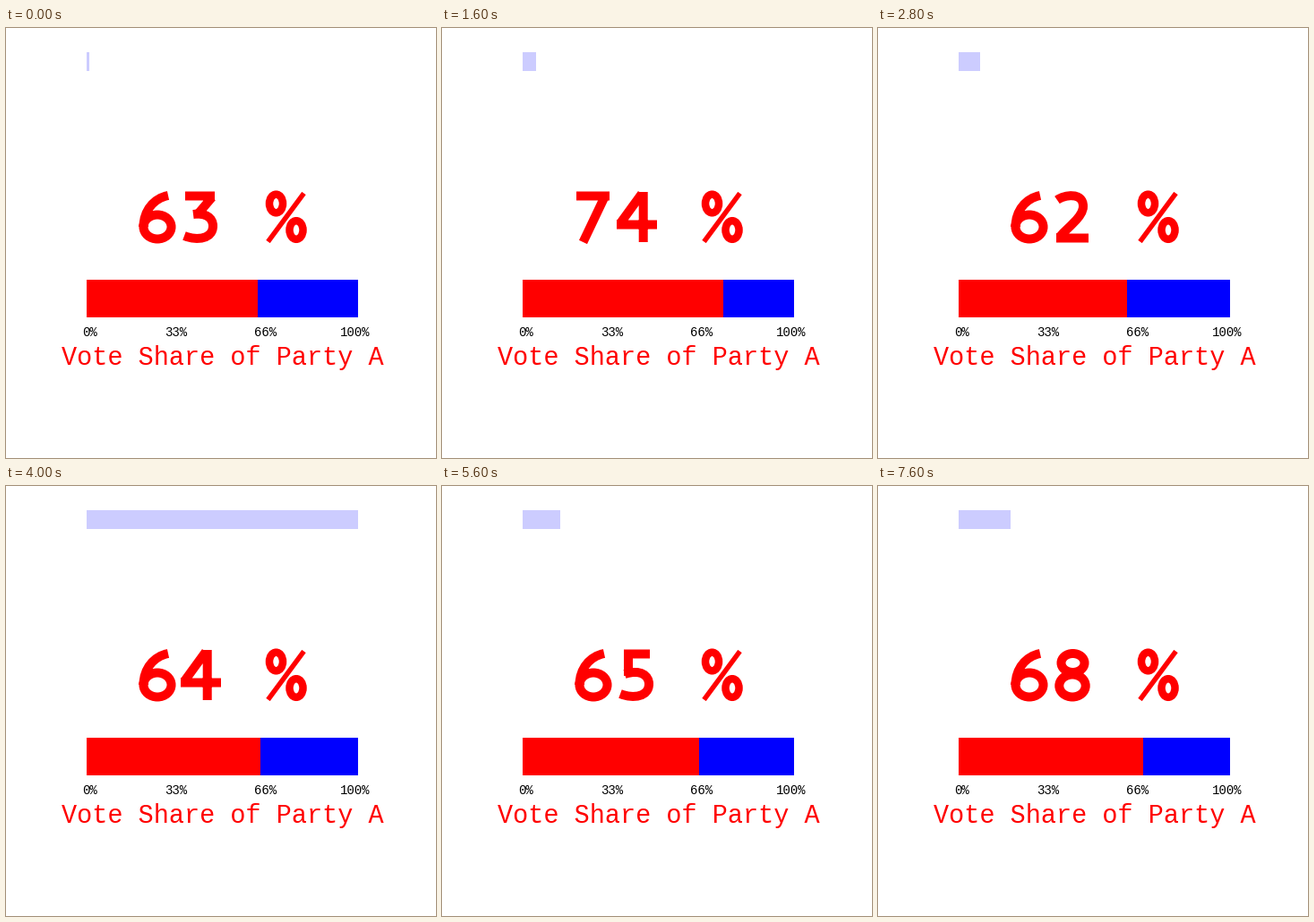
A matplotlib script for the animation above (8000 ms loop, 480x480 px).

```python
import numpy as np
import matplotlib.pyplot as plt
from matplotlib.animation import FuncAnimation
from matplotlib.patches import PathPatch, Rectangle
from matplotlib.path import Path

SIZE, DPI = 480, 100
PX = 72 / DPI
LEFT, WIDTH = 90, 303
RED, BLUE, PALE = "#ff0000", "#0000ff", "#ccccff"
CELL, CELL_TOP, NUMBER_X = 48, 182, 145

SHARES = [63, 69, 67, 65, 74, 66, 72, 62, 67, 65,
          64, 66, 72, 67, 65, 72, 62, 61, 71, 68]
ROUNDS = [*range(1, 11), 100, *range(11, 20)]

# Stroke outlines inside a 48 x 58 cell; O is an ellipse: cx cy rx ry.
GLYPHS = {
    "1": "M 6 16 L 25 4 M 25 1 L 25 53 M 8 52.5 L 43 52.5",
    "2": "M 7 10 C 15 4 36 1 36 17 C 36 29 19 40 10 51 M 6 52.5 L 42 52.5",
    "3": "M 7 5.5 L 40 5.5 M 37 7 L 20 27 M 16 26 "
         "C 30 24 38 30 38 39 C 38 53 21 56 6 50",
    "4": "M 2 37.5 L 47 37.5 M 31.7 1 L 31.7 57 M 30 3 L 6 36",
    "5": "M 10 5.5 L 39 5.5 M 15 1 L 15 30 M 11 28 "
         "C 29 22 38 30 38 39 C 38 53 21 56 6 50",
    "6": "M 36 5 C 20 8 8.5 22 8.5 40 O 24 40 15.5 13.5",
    "7": "M 5 5.5 L 42 5.5 M 37 5.5 L 12.5 57",
    "8": "O 24.5 15.5 13 10.5 O 24 41 14.7 12.5",
    "9": "M 12 53 C 28 50 39.5 36 39.5 18 O 24 18 15.5 13.5",
    "rings": "O 12.5 14 7.5 10.3 O 35 43.5 7.5 10.3",
    "slash": "M 3.5 56.5 L 43.5 2.5",
}
OPS = {"M": (2, Path.MOVETO), "L": (2, Path.LINETO),
       "C": (6, Path.CURVE4), "O": (4, None)}


def glyph(name, cell):
    """Build the path of a glyph placed in the given character cell."""
    tokens = iter(GLYPHS[name].split())
    circle = Path.unit_circle()
    points, codes = [], []
    for op in tokens:
        count, code = OPS[op]
        nums = np.array([float(next(tokens)) for _ in range(count)])
        if op == "O":
            points.extend(circle.vertices * nums[2:] + nums[:2])
            codes.extend(circle.codes)
        else:
            points.extend(nums.reshape(-1, 2))
            codes.extend([code] * (count // 2))
    origin = np.array([NUMBER_X + cell * CELL, CELL_TOP])
    return Path(np.array(points) + origin, codes)


fig = plt.figure(figsize=(SIZE / DPI, SIZE / DPI), dpi=DPI, facecolor="white")
ax = fig.add_axes([0, 0, 1, 1])
ax.set(xlim=(0, SIZE), ylim=(SIZE, 0))
ax.axis("off")


def bar(top, height, color):
    return ax.add_patch(Rectangle((LEFT, top), WIDTH, height, fc=color, lw=0))


def strokes(name, cell, width):
    return ax.add_patch(PathPatch(glyph(name, cell), fill=False, ec=RED,
                                  lw=width * PX, capstyle="butt"))


def label(x, baseline, text, size, color):
    ax.text(x, baseline, text, fontsize=size * PX, color=color, ha="center",
            va="baseline", family="Liberation Mono")


progress = bar(27, 21, PALE)
bar(281, 42, BLUE)
share_bar = bar(281, 42, RED)
digits = [strokes("6", 0, 10), strokes("3", 1, 10)]
strokes("rings", 3, 8.5)
strokes("slash", 3, 5.5)

for x, text in [(93, "0%"), (190, "33%"), (290, "66%"), (390, "100%")]:
    label(x, 344, text, 14, "black")
label(241.5, 376.5, "Vote Share of Party A", 28.5, RED)


def update(i):
    share = SHARES[i]
    progress.set_width(round(WIDTH * ROUNDS[i] / 100))
    share_bar.set_width(round(WIDTH * share / 100))
    for cell, char in enumerate(str(share)):
        digits[cell].set_path(glyph(char, cell))
    return [progress, share_bar, *digits]


anim = FuncAnimation(fig, update, frames=len(SHARES), interval=400,
                     repeat=True, repeat_delay=0)
plt.show()
```
